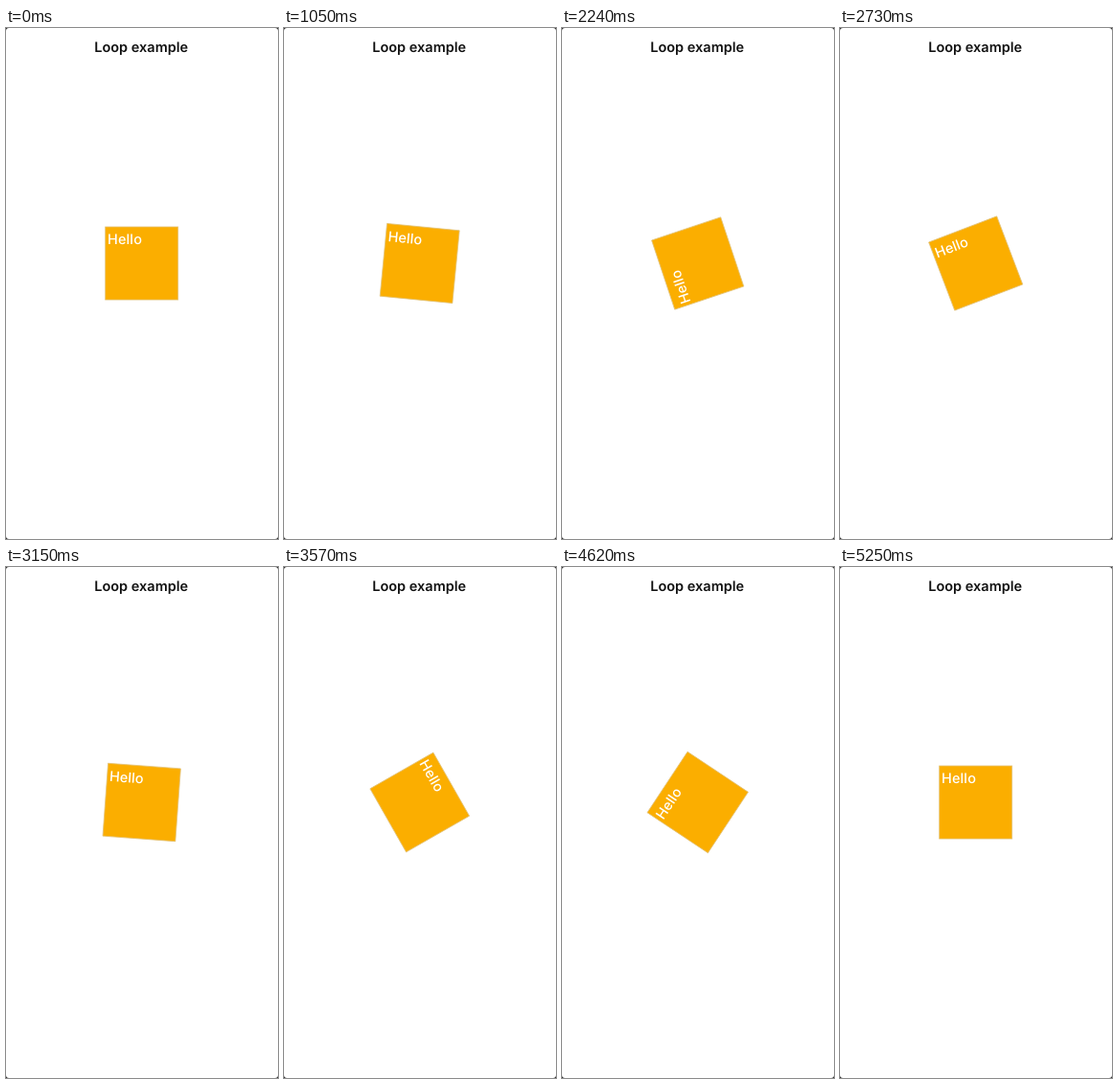
Recreate the animation shown at these times as an HTML page. Size 284x532 px, loop 6020 ms.

```html
<!DOCTYPE html>
<html lang="en">
<head>
<meta charset="utf-8">
<title>Loop example</title>
<style>
  html, body { margin: 0; width: 100%; height: 100%; overflow: hidden; background: #222; }
  svg {
    display: block; width: 284px; height: 532px; background: #fff; border-radius: 3px;
    font: 500 14.5px Inter, "Liberation Sans", sans-serif; text-rendering: geometricPrecision;
  }
  .title { font-weight: 600; fill: #111; text-anchor: middle; }
  .hello { fill: #fff; letter-spacing: 0.1px; }
  rect { fill: #fbae00; stroke: #e3c47c; stroke-width: 0.8px; }
</style>
</head>
<body>
<svg viewBox="0 0 284 532">
  <text class="title" x="141.2" y="24.5">Loop example</text>
  <g id="box">
    <rect x="-38" y="-38" width="76" height="76"/>
    <text class="hello" x="-35.6" y="-19.6">Hello</text>
  </g>
</svg>
<script>
  const LOOP = 6020, STEP = 70;
  // [time in ms, turns begun]: two eased turns at a nearly steady pace
  const PACE = [[0, 0], [905, 0], [1540, 0.3], [2240, 0.632], [2730, 0.859],
                [3570, 1.259], [4130, 1.516], [5140, 2], [LOOP, 2]];
  const box = document.getElementById("box");

  function progress(t) {
    const i = PACE.findIndex(p => p[0] > t);
    const [t0, p0] = PACE[i - 1], [t1, p1] = PACE[i];
    return p0 + (p1 - p0) * (t - t0) / (t1 - t0);
  }

  // cubic-bezier(0.42, 0, 1, 1), solved by bisection
  function easeIn(x) {
    let lo = 0, hi = 1;
    for (let i = 0; i < 24; i++) {
      const s = (lo + hi) / 2, r = 1 - s;
      if (1.26 * r * r * s + 3 * r * s * s + s * s * s < x) lo = s; else hi = s;
    }
    return lo * lo * (3 - 2 * lo);
  }

  const easeInOut = x => x < 0.5 ? easeIn(2 * x) / 2 : 1 - easeIn(2 - 2 * x) / 2;

  const start = performance.now();
  function draw(now) {
    const t = Math.floor(Math.max(0, now - start) % LOOP / STEP) * STEP;
    const angle = 360 * easeInOut(progress(t) % 1);
    box.setAttribute("transform", `translate(141.7 245) rotate(${angle})`);
    requestAnimationFrame(draw);
  }
  draw(start);
</script>
</body>
</html>
```
